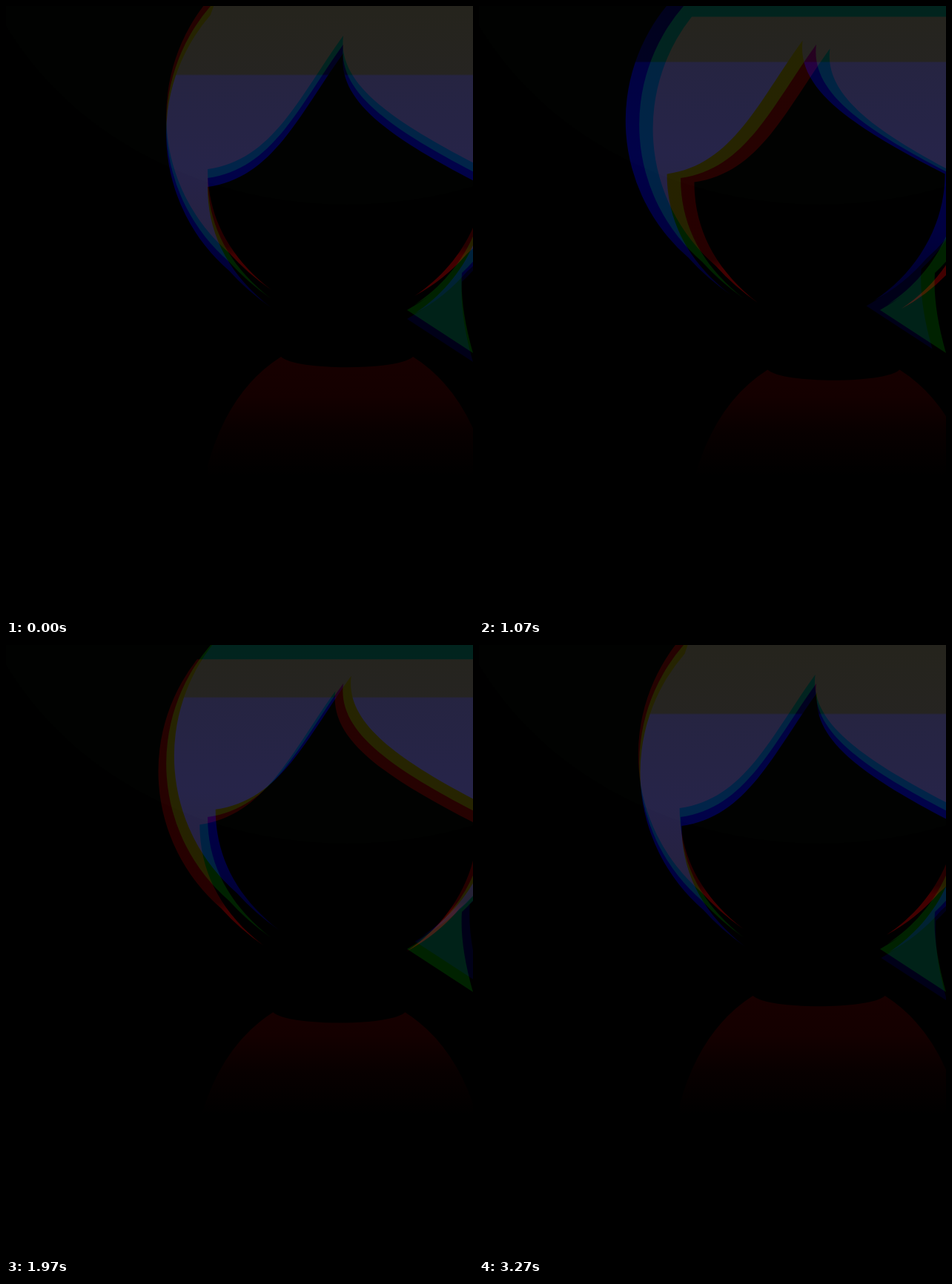
Write an HTML page that moves like this. It is 630 by 824 pixels and loops after 3310 ms.

```html
<!DOCTYPE html>
<html lang="en">
<head>
<meta charset="utf-8">
<title>Colour split</title>
<style>
  html, body { margin: 0; width: 100%; height: 100%; overflow: hidden; background: #000; }
  svg { display: block; width: 630px; height: 824px; isolation: isolate; }
  .layer { mix-blend-mode: screen; }
</style>
</head>
<body>
<svg viewBox="0 0 630 824">
  <defs>
    <path id="hair" d="M276 0 A244 244 0 0 0 301 345 Q325 372 358 395
      C300 350 272 295 272 232 C360 220 395 135 455 52
      C447 115 515 165 647 232 C647 300 610 364 551 403
      Q592 381 622 346 A244 244 0 0 0 644 0 L630 -40 H290 Z"/>
    <path id="flick" d="M541 410 C600 377 626 335 634 300 L660 305 Q638 339 615 360
      Q612 405 630 468 Z"/>
    <path id="body" d="M371 485 C390 504 530 504 549 485 Q620 530 648 632 V660 H272 V632 Q300 530 371 485 Z"/>
    <clipPath id="top"><rect x="-50" y="9" width="800" height="700"/></clipPath>
    <linearGradient id="redFill" gradientUnits="userSpaceOnUse" x1="0" y1="0" x2="0" y2="410">
      <stop offset="0" stop-color="#240000"/>
      <stop offset=".82" stop-color="#260000"/>
      <stop offset=".85" stop-color="#420000"/>
      <stop offset="1" stop-color="#440000"/>
    </linearGradient>
    <linearGradient id="blueFill" gradientUnits="userSpaceOnUse" x1="0" y1="0" x2="0" y2="410">
      <stop offset="0" stop-color="#00001c"/>
      <stop offset=".195" stop-color="#000020"/>
      <stop offset=".2" stop-color="#000040"/>
      <stop offset=".5" stop-color="#000048"/>
      <stop offset=".75" stop-color="#000040"/>
      <stop offset="1" stop-color="#000028"/>
    </linearGradient>
    <linearGradient id="fade" gradientUnits="userSpaceOnUse" x1="0" y1="460" x2="0" y2="634">
      <stop offset="0" stop-color="#180000"/>
      <stop offset=".38" stop-color="#140000"/>
      <stop offset=".66" stop-color="#080000"/>
      <stop offset="1" stop-color="#000"/>
    </linearGradient>
    <clipPath id="bodyClip"><use id="bodyShape" href="#body"/></clipPath>
  </defs>

  <rect width="630" height="824"/>
  <ellipse cx="460" cy="-170" rx="515" ry="438" fill="#010201"/>
  <rect y="460" width="630" height="174" fill="url(#fade)" clip-path="url(#bodyClip)"/>
  <g class="layer" fill="#002200">
    <use href="#hair"/><use href="#flick"/>
  </g>
  <g class="layer" id="blue">
    <use href="#flick" fill="#000018"/><use href="#hair" fill="url(#blueFill)"/>
  </g>
  <g class="layer" id="red" fill="url(#redFill)">
    <g clip-path="url(#top)"><use href="#hair"/></g>
  </g>
</svg>
<script>
  const LOOP = 3310;
  // [time in ms, angle in degrees] along the elliptical drift
  const keys = [[0, -90], [730, -4], [1370, 54], [1970, 121], [2430, 156], [2770, 176], [3270, 266]];
  const [red, blue, bodyShape] = ['red', 'blue', 'bodyShape'].map(id => document.getElementById(id));

  function key(i) {
    const n = keys.length, turn = Math.floor(i / n), [t, a] = keys[i - turn * n];
    return [t + turn * LOOP, a + turn * 360];
  }

  function slope(i) {
    const [t0, a0] = key(i - 1), [t1, a1] = key(i + 1);
    return (a1 - a0) / (t1 - t0);
  }

  function angleAt(t) {
    let i = 0;
    while (key(i + 1)[0] <= t) i++;
    const [t0, a0] = key(i), [t1, a1] = key(i + 1);
    const h = t1 - t0, u = (t - t0) / h, v = 1 - u;
    return v * v * (1 + 2 * u) * a0 + u * u * (3 - 2 * u) * a1
      + h * u * v * (v * slope(i) - u * slope(i + 1));
  }

  function move(el, x, y) {
    el.setAttribute('transform', `translate(${x.toFixed(2)} ${y.toFixed(2)})`);
  }

  function draw() {
    const a = angleAt(performance.now() % LOOP) * Math.PI / 180;
    const x = 20.7 * Math.cos(a), y = 12 * Math.sin(a);
    move(red, x, y);
    move(bodyShape, x, y);
    move(blue, -x, -y);
    requestAnimationFrame(draw);
  }
  draw();
</script>
</body>
</html>
```
